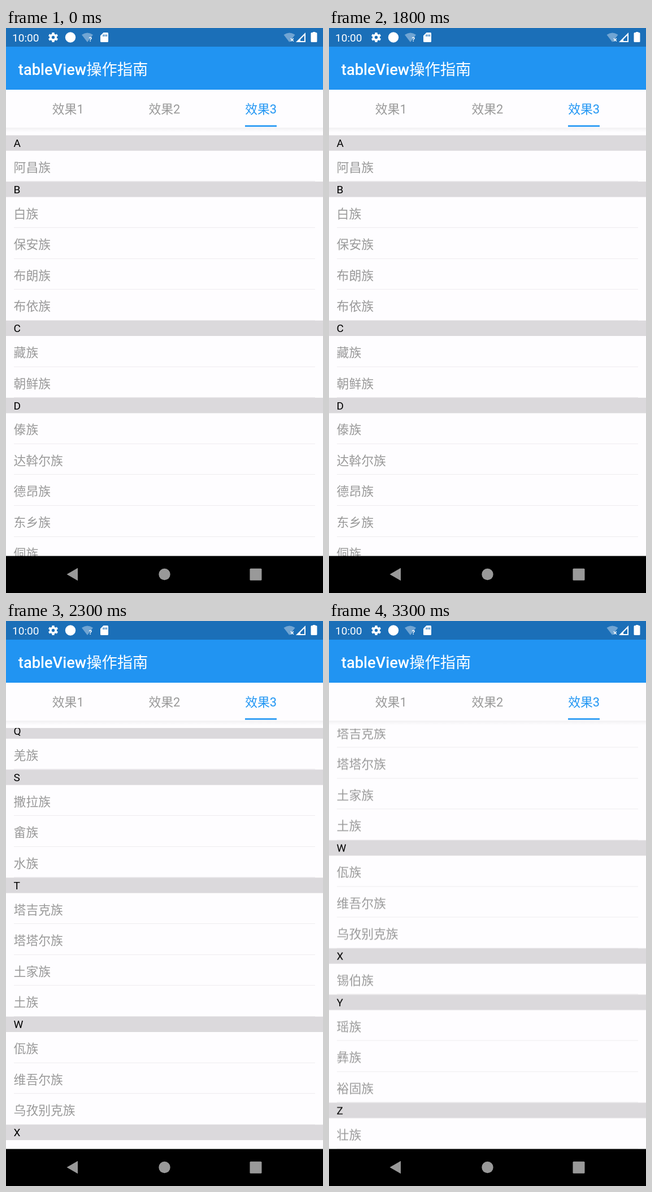
An HTML page for the animation above (3.4 s loop, 561x998 px).

```html
<!DOCTYPE html>
<html lang="zh-CN">
<head>
<meta charset="utf-8">
<title>tableView操作指南</title>
<style>
  html, body { margin: 0; width: 100%; height: 100%; overflow: hidden; background: #fefdff; }
  svg { display: block; width: 561px; height: 998px; }
  text { font-family: Roboto, "Noto Sans CJK SC", "Noto Sans CJK", sans-serif; }
  .title { font-size: 27.27px; font-weight: 500; fill: #fff; }
  .title tspan { font-weight: 400; }
  .tab, .name { font-size: 21.82px; fill: #999; }
  .tab.on { fill: #2196f3; }
  .letter { font-size: 19.09px; fill: #000; }
  .clock { font-size: 19.09px; fill: #fff; }
  .band { fill: #dbd9dc; }
  .rule { fill: #eeecef; shape-rendering: crispEdges; }

  #list { animation: scroll 3400ms step-end infinite; }
  #glow {
    fill: #2196f3; opacity: 0; transform-origin: 0 932.6px;
    animation: glow 3400ms step-end infinite;
  }
  /* Fling to the end of the list, sampled every 100 ms */
  @keyframes scroll {
    0% { transform: translateY(0); }
    55.88% { transform: translateY(-570px); }
    58.82% { transform: translateY(-1094.8px); }
    61.76% { transform: translateY(-1583px); }
    64.7% { transform: translateY(-2064.8px); }
    67.64% { transform: translateY(-2545px); }
    70.58%, 100% { transform: translateY(-2856.5px); }
  }
  /* Overscroll glow: quick swell, then a decelerating retreat */
  @keyframes glow {
    0% { opacity: 0; transform: scaleY(0); }
    70.58% { opacity: .29; transform: scaleY(.94); }
    73.52% { opacity: .224; transform: scaleY(.748); }
    76.47% { opacity: .146; transform: scaleY(.487); }
    79.41% { opacity: .085; transform: scaleY(.283); }
    82.35% { opacity: .04; transform: scaleY(.133); }
    85.29%, 100% { opacity: 0; transform: scaleY(0); }
  }
</style>
</head>
<body>
<svg viewBox="0 0 561 998" xmlns="http://www.w3.org/2000/svg">
  <defs>
    <clipPath id="view"><rect y="189.5" width="561" height="743.1"/></clipPath>
    <linearGradient id="shade" x2="0" y2="1">
      <stop offset="0" stop-color="#f2f1f3"/>
      <stop offset="1" stop-color="#fefdff"/>
    </linearGradient>
  </defs>
  <rect width="561" height="998" fill="#fefdff"/>

  <g clip-path="url(#view)">
    <g id="list"></g>
    <circle id="glow" cx="280.5" cy="1661.35" r="841.5"/>
  </g>

  <!-- Title bar and tabs -->
  <rect y="32" width="561" height="77" fill="#2194f2"/>
  <text class="title" x="21.8" y="82.6">tableView<tspan>操作指南</tspan></text>
  <text class="tab" x="81.8" y="151.2">效果1</text>
  <text class="tab" x="252.5" y="151.2">效果2</text>
  <text class="tab on" x="423.2" y="151.2">效果3</text>
  <rect y="176" width="561" height="8" fill="url(#shade)"/>
  <rect x="423" y="171.8" width="56" height="2.7" fill="#2196f3"/>

  <!-- Status bar -->
  <rect width="561" height="33" fill="#1b6fb8"/>
  <text class="clock" x="11" y="23.8">10:00</text>
  <g fill="#fff">
    <g transform="translate(83.5 16.5)">
      <circle r="4.6" fill="none" stroke="#fff" stroke-width="3.8"/>
      <g id="teeth"></g>
    </g>
    <circle cx="114" cy="16.5" r="9.2"/>
    <path id="wifi" d="M134 12Q144 4.8 154 12L144 25Z" opacity=".38"/>
    <text x="146.5" y="24" font-size="11.5" font-weight="700">?</text>
    <path fill-rule="evenodd" d="M172.5 8H179.500Q181 8 181 9.500V23.500Q181 25 179.500 25H168.500Q167 25 167 23.500V13.500ZM171.500 11.500V15H173V11.500ZM174.500 11.500V15H176V11.500ZM177.500 11.500V15H179V11.500Z"/>
    <use href="#wifi" x="357.500"/>
    <path d="M503.800 18.500l5 5m0-5l-5 5" stroke="#fff" stroke-width="1.600"/>
    <path fill-rule="evenodd" d="M513 25L530 8V25ZM521 23H528V13L521 20Z"/>
    <path d="M543 8V7H547.500V8H549Q550.500 8 550.500 9.500V23.500Q550.500 25 549 25H541Q539.500 25 539.500 23.500V9.500Q539.500 8 541 8Z"/>
  </g>

  <!-- Navigation bar -->
  <rect y="932.6" width="561" height="65.4"/>
  <g fill="#999">
    <path d="M107.500 965L127 953.800V976.200Z"/>
    <circle cx="280.500" cy="965" r="10.200"/>
    <rect x="431.500" y="954.800" width="21" height="21" rx="1.500"/>
  </g>
</svg>
<script>
  const UNIT = 27.27, TOP = 189.5, LEFT = 13.6;
  const groups = {
    A: '阿昌',
    B: '白 保安 布朗 布依',
    C: '藏 朝鲜',
    D: '傣 达斡尔 德昂 东乡 侗 独龙',
    E: '鄂伦春 俄罗斯 鄂温克',
    G: '高山 仡佬',
    H: '哈尼 汉 哈萨克 赫哲 回',
    J: '景颇 京 基诺',
    K: '柯尔克孜',
    L: '拉祜 傈僳 珞巴 黎',
    M: '满 毛南 门巴 蒙古 苗 仫佬',
    N: '纳西 怒',
    P: '普米',
    Q: '羌',
    S: '撒拉 畲 水',
    T: '塔吉克 塔塔尔 土家 土',
    W: '佤 维吾尔 乌孜别克',
    X: '锡伯',
    Y: '瑶 彝 裕固',
    Z: '壮'
  };

  const rect = (cls, x, y, w, h) =>
    `<rect class="${cls}" x="${x}" y="${y}" width="${w}" height="${h}"/>`;
  const label = (cls, y, text) => `<text class="${cls}" x="${LEFT}" y="${y}">${text}</text>`;

  let y = TOP, rows = '';
  for (const [letter, names] of Object.entries(groups)) {
    rows += rect('band', 0, y, 561, UNIT) + label('letter', y + 20.7, letter);
    y += UNIT;
    for (const name of names.split(' ')) {
      rows += label('name', y + 37, name + '族');
      y += 2 * UNIT;
      rows += rect('rule', LEFT, y - 1, 533.8, 1);
    }
  }
  document.getElementById('list').innerHTML = rows;

  document.getElementById('teeth').innerHTML = [0, 60, 120, 180, 240, 300]
    .map(a => `<rect x="-2.1" y="-8.6" width="4.2" height="4" rx=".5" transform="rotate(${a})"/>`)
    .join('');
</script>
</body>
</html>
```
